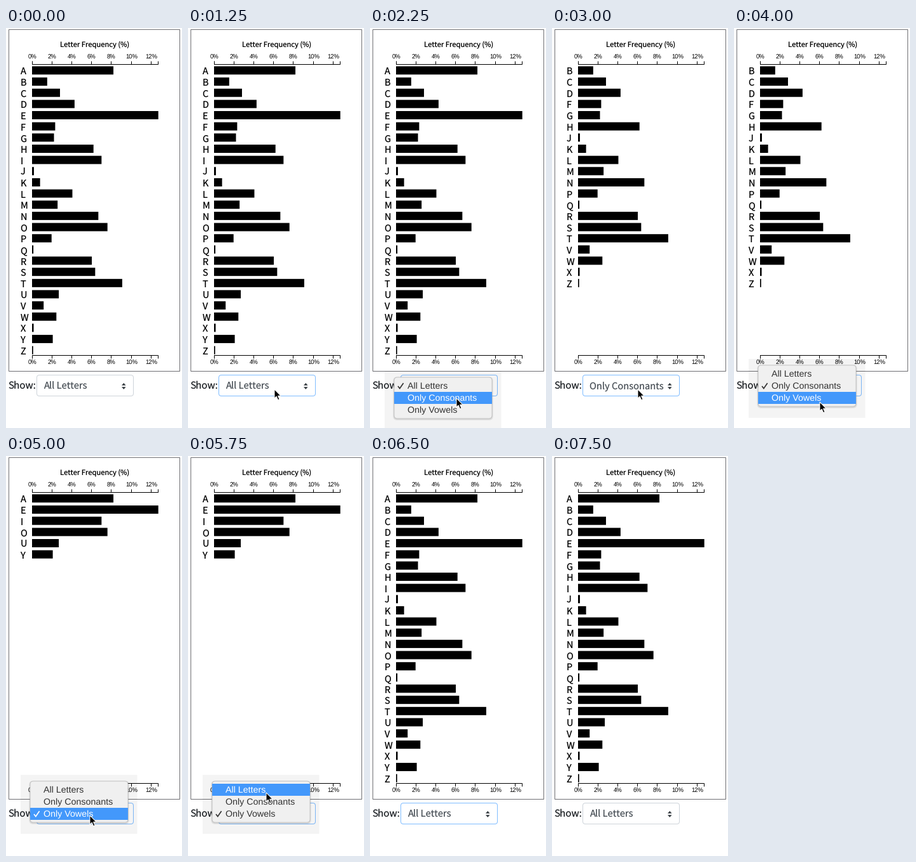
Write a matplotlib script that moves like this. It is 277 by 631 pixels and loops after 7.75 s.

```python
import matplotlib.pyplot as plt
import numpy as np
from matplotlib.animation import FuncAnimation
from matplotlib.patches import FancyBboxPatch, Polygon, Rectangle

plt.rcParams["path.snap"] = False
plt.rcParams["text.hinting"] = "none"

W, H, DPI = 277, 631, 64
STEP, LOOP = 250, 7750

PAGE_FONT = "Noto Sans CJK JP"
UI_FONT = "Liberation Sans"

# Letters by falling frequency; percentages run straight between key ranks.
RANKED = "ETAOINSHRDLCUMWFGYPBVKJXQZ"
KEY_RANKS = [0, 1, 2, 4, 6, 8, 9, 10, 11, 18, 19, 21, 22, 25]
KEY_PCTS = [12.7, 9.06, 8.17, 6.97, 6.33, 5.99, 4.25, 4.03, 2.78, 1.93,
            1.49, 0.77, 0.15, 0.07]
FREQ = dict(sorted(zip(RANKED, np.interp(range(26), KEY_RANKS, KEY_PCTS))))

VOWELS = "AEIOUY"
OPTIONS = ["All Letters", "Only Consonants", "Only Vowels"]
FILTERS = [lambda c: True, lambda c: c not in VOWELS, lambda c: c in VOWELS]

X0, PER_PCT = 41, 15.6
TOP_AXIS, BOTTOM_AXIS = 57, 516
ROW = (BOTTOM_AXIS - TOP_AXIS) / 26
ITEM = 19

# Menu visits: opens, starts to fade, is gone, option picked.
VISITS = [(1750, 2750, 3000, 1), (3500, 4500, 4500, 2), (5000, 6250, 6500, 0)]
BLINK = 2500
# Cursor glides: start, end, x, y.
START = (138, 583)
GLIDES = [(750, 1000, 136, 570), (2000, 2250, 136, 584),
          (2750, 3000, 135, 570), (3500, 4000, 135, 590),
          (4500, 4750, 132, 567), (5000, 5750, 123, 531)]

fig = plt.figure(figsize=(W / DPI, H / DPI), dpi=DPI, facecolor="white")
ax = fig.add_axes([0, 0, 1, 1])


def px(n):
    return n * 72 / DPI


def text(x, y, s, size, font=PAGE_FONT, color="black", **kw):
    ax.text(x, y, s, fontsize=px(size), family=font, color=color,
            va="baseline", **kw)


def rect(x, y, w, h, color, **kw):
    ax.add_patch(Rectangle((x, y), w, h, fc=color, lw=0, **kw))


def rounded(x, y, w, h, r, face, edge="none", lw=1.0, **kw):
    ax.add_patch(FancyBboxPatch(
        (x, y), w, h, boxstyle=f"round,pad=0,rounding_size={r}",
        fc=face, ec=edge, lw=px(lw), **kw))


def line(xs, ys, color="black", lw=1.0, **kw):
    ax.plot(xs, ys, color=color, lw=px(lw), solid_capstyle="butt",
            solid_joinstyle="miter", **kw)


def axis(y, out, baseline):
    left, right, y = X0 + 0.5, 239.5, y + 0.5
    tip = y + out * 5
    line([left, left, right, right], [tip, y, y, tip])
    for pct in range(0, 13, 2):
        x = int(X0 + pct * PER_PCT) + 0.5
        line([x, x], [y, tip])
        text(x, baseline, f"{pct}%", 9.5, UI_FONT, ha="center")


def chart(choice):
    ax.add_patch(Rectangle((4.5, 2.5), 269, 539, fc="white", ec="#6f6f73",
                           lw=px(1)))
    text(139.5, 30, "Letter Frequency (%)", 11.2, ha="center")
    axis(TOP_AXIS, -1, 49)
    axis(BOTTOM_AXIS, 1, 530.5)
    for i, c in enumerate(filter(FILTERS[choice], FREQ)):
        y = 60.4 + i * ROW
        rect(X0, y, FREQ[c] * PER_PCT + 0.6, 13, "black")
        text(22.6, y + 13, c, 14.5)


def select(choice, focus):
    text(3.2, 568.5, "Show:", 15.2, color="#212529")
    rounded(48.5, 547.5, 152, 33, 4, "white",
            "#80bdff" if focus else "#ced4da")
    text(59, 570.3, OPTIONS[choice], 14.7, color="#495057")
    for base, tip in ((563.8, 560), (566.2, 570)):
        ax.add_patch(Polygon([(182, base), (188.6, base), (185.3, tip)],
                             fc="#343a40", lw=0))


def menu(choice, pointer_y, blink, alpha):
    top = 551 - ITEM * choice
    height = 8 + 3 * ITEM
    hover = None if blink else int((pointer_y - top - 4) // ITEM)
    rect(23, top - 10, 183.5, height + 28, "black", alpha=0.045 * alpha)
    for grow in (2, 1):
        rounded(38 - grow, top - grow + 1, 154 + 2 * grow, height + 2 * grow,
                5 + grow, "black", alpha=0.06 * alpha)
    rounded(38, top, 154, height, 5, "#f0f0f0", "#bdbdbd", 0.8, alpha=alpha)
    for i, name in enumerate(OPTIONS):
        y = top + 4 + i * ITEM
        ink = "#333333"
        if i == hover:
            rect(38, y, 154, ITEM, "#4398fb", alpha=alpha)
            ink = "white"
        text(58.8, y + 14.3, name, 14.3, UI_FONT, ink, alpha=alpha)
        if i == choice:
            line([44, 46.8, 52.6], [y + 10, y + 13.6, y + 5.2], ink, 1.7,
                 alpha=alpha)


def pointer(t):
    pos = np.array(START, float)
    for start, end, x, y in GLIDES:
        u = np.clip((t - start) / (end - start), 0, 1)
        pos += (np.array((x, y)) - pos) * (1 - (1 - u) ** 2)
    return pos


def cursor(pos):
    arrow = [(0, 0), (0, 14.2), (3.2, 11.2), (5.6, 16.8), (8, 15.8),
             (5.6, 10.3), (10, 10.2)]
    ax.add_patch(Polygon(pos + np.array(arrow), fc="black", ec="white",
                         lw=px(1)))


def draw(i):
    t = i * STEP
    ax.clear()
    ax.set(xlim=(0, W), ylim=(H, 0))
    ax.axis("off")
    choice = ([0] + [pick for *_, gone, pick in VISITS if gone <= t])[-1]
    pos = pointer(t)
    chart(choice)
    select(choice, 1250 <= t < 7250)
    for opens, fades, gone, _ in VISITS:
        if opens <= t < gone:
            menu(choice, pos[1], t == BLINK, 0.5 if t >= fades else 1)
    if 750 <= t < 6500:
        cursor(pos)
    # Equal depth makes everything stack in the order it was drawn.
    for artist in [*ax.patches, *ax.lines, *ax.texts]:
        artist.set_zorder(1)


anim = FuncAnimation(fig, draw, frames=LOOP // STEP, interval=STEP,
                     init_func=lambda: None, repeat=True, repeat_delay=0)
plt.show()
```
